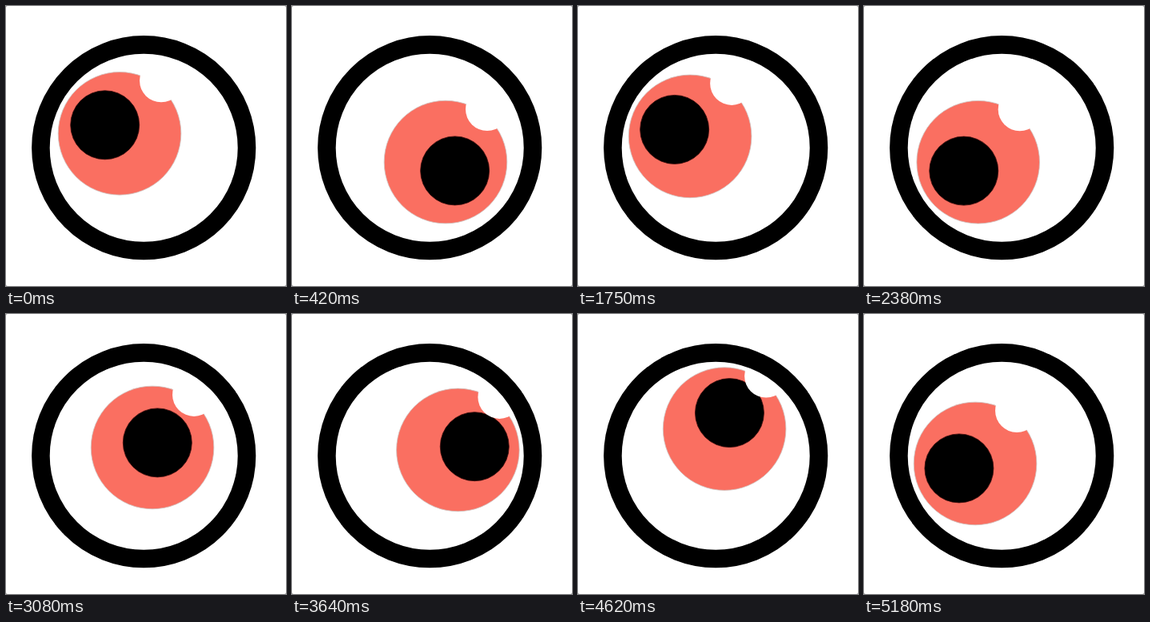
An HTML page that plays this animation: 350x350 px, repeating every 5.25 s.

```html
<!DOCTYPE html>
<html lang="en">
<head>
<meta charset="utf-8">
<title>Rolling eye</title>
<style>
  html, body { margin: 0; width: 100%; height: 100%; overflow: hidden; background: #999; }
  svg { display: block; width: 100%; height: 100%; }
</style>
</head>
<body>
<svg viewBox="0 0 350 350">
  <rect width="350" height="350" rx="2" fill="#fff"/>
  <g id="iris">
    <circle r="76.8" fill="#fa6f61" stroke="#cfc4c2" stroke-width=".8"/>
  </g>
  <circle id="pupil" r="43" stroke="#3a0c0c" stroke-width=".8"/>
  <circle id="glint" cx="52" cy="-66" r="27" fill="#fff"/>
  <circle cx="172.2" cy="177.2" r="128.8" fill="none" stroke="#000" stroke-width="22.6"/>
</svg>
<script>
const LOOP = 5250, STEP = 70, CX = 172.6, CY = 177;

// Gaze: [time in ms, angle in degrees, signed distance from the centre]
const gaze = [
  [0, 30, -35.3], [420, 43, 26.5], [490, 48, 35], [1120, 333, 35],
  [1190, 358, 34.5], [1680, 416, 35], [1750, 203.5, 35.4], [1960, 270, 35],
  [2240, 172, 35], [2450, 137, 35], [2800, 146, 7.6], [3080, 136, -14.5],
  [3360, 135, -36], [3360, 315, 36], [3920, 382, 35], [4060, 408, 35],
  [4480, 565, 35], [5040, 895, 35], [5180, 883.5, 35], [LOOP, 883.5, 35]
];

const [iris, pupil, glint] = ["iris", "pupil", "glint"].map(id => document.getElementById(id));

function lookAt(t) {
  const i = gaze.findIndex(k => k[0] > t);
  const a = gaze[i - 1], b = gaze[i];
  const p = (t - a[0]) / (b[0] - a[0]);
  const angle = (a[1] + (b[1] - a[1]) * p) * Math.PI / 180;
  const dist = a[2] + (b[2] - a[2]) * p;
  return [Math.cos(angle) * dist, Math.sin(angle) * dist];
}

function place(el, x, y, depth) {
  el.setAttribute("transform", `translate(${CX + x * depth} ${CY + y * depth})`);
}

function draw() {
  const t = Math.floor(performance.now() % LOOP / STEP) * STEP;
  const [x, y] = lookAt(t);
  place(iris, x, y, 1);
  place(glint, x, y, 1);
  place(pupil, x, y, 1.6);
  requestAnimationFrame(draw);
}
draw();
</script>
</body>
</html>
```
